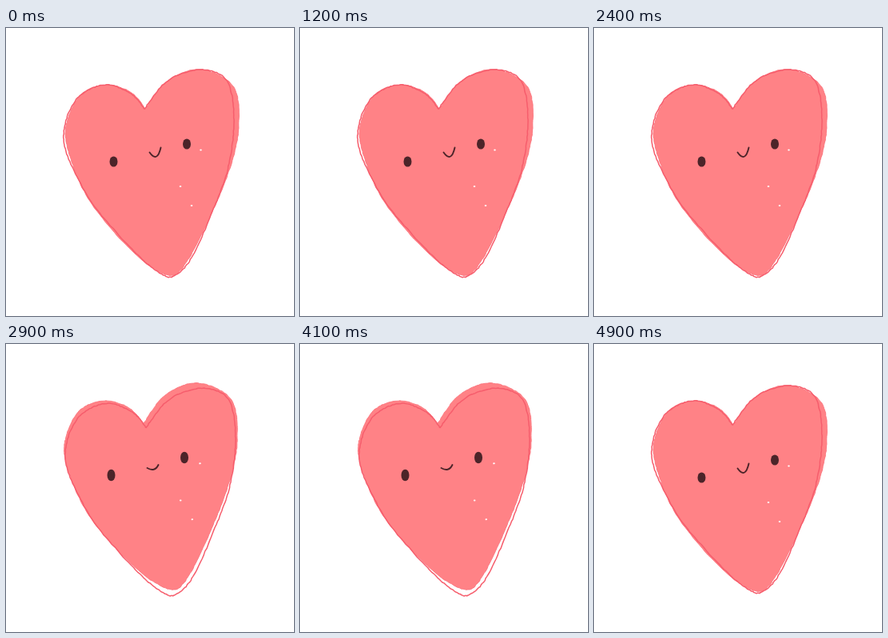
An HTML page with a canvas for the animation above (5000 ms loop, 360 px wide and 360 px high).

```html
<!DOCTYPE html>
<html lang="en">
<head>
<meta charset="utf-8">
<title>Wobbling heart</title>
<style>
  html, body { margin: 0; width: 100%; height: 100%; overflow: hidden; background: #fff; }
  canvas { display: block; width: 360px; height: 360px; }
</style>
</head>
<body>
<canvas id="stage" width="360" height="360"></canvas>
<script>
const ctx = document.getElementById('stage').getContext('2d');
const STEP = 100;
const ORDER = 'ABDABDACBCAB'.repeat(4).slice(0, 42) + 'BCBCBCCA';
const INK = '#4c2429';

// Key points run from the notch round to the notch, which stays sharp.
const FILL = [[174, 101], [157, 81], [126, 71], [94, 83], [76, 118], [78, 154], [105, 217],
  [160, 281], [203, 309], [226, 292], [256, 234], [281, 172], [291, 122], [284, 73],
  [243, 52], [202, 66], [174, 101]];
const LINE = [[173, 101], [156, 82], [124, 71], [91, 86], [74, 120], [76, 157], [108, 219],
  [160, 279], [192, 306], [210, 310], [232, 287], [261, 222], [278, 173], [285, 115],
  [276, 66], [243, 52], [202, 66], [173, 101]];
const SPECKS = [[218, 198], [232, 222], [243.5, 152.5]];

// Paint, outline and face slip against each other; turn is the paint's tilt.
const POSES = {
  A: { fill: [0, 0], turn: 0, line: [0, 0], face: [134.5, 167], smile: 1 },
  B: { fill: [-5, -2], turn: 0, line: [0, 1], face: [129.5, 164], smile: 0 },
  C: { fill: [0, -1], turn: -.022, line: [2, 4.5], face: [131, 163], smile: 0 },
  D: { fill: [0, -1.5], turn: -.026, line: [2, 3.3], face: [131.5, 164], smile: 0 }
};

const noise = n => {
  const v = Math.sin(n * 127.1) * 43758.5453;
  return v - Math.floor(v) - .5;
};

// Catmull-Rom through the points, with a slight hand-drawn tremble
function trace(points, seed) {
  const path = new Path2D();
  const last = points.length - 1;
  const at = i => points[Math.max(0, Math.min(last, i))];
  let n = seed * 1000;
  for (let i = 0; i < last; i++) {
    const [p, q, r, s] = [at(i - 1), at(i), at(i + 1), at(i + 2)];
    for (let u = 0; u < 1; u += .0625) {
      const [x, y] = [0, 1].map(k => .5 * (2 * q[k] + (r[k] - p[k]) * u
        + (2 * p[k] - 5 * q[k] + 4 * r[k] - s[k]) * u * u
        + (3 * q[k] - p[k] - 3 * r[k] + s[k]) * u ** 3) + noise(++n) * .8);
      path.lineTo(x, y);
    }
  }
  path.closePath();
  return path;
}

const fillPath = trace(FILL, 1);
const linePath = trace(LINE, 2);

function placed([x, y], paint, turn = 0) {
  ctx.save();
  ctx.translate(x + 180, y + 190);
  ctx.rotate(turn);
  ctx.translate(-180, -190);
  paint();
  ctx.restore();
}

function ellipse(x, y, rx, ry, color) {
  ctx.fillStyle = color;
  ctx.beginPath();
  ctx.ellipse(x, y, rx, ry, 0, 0, Math.PI * 2);
  ctx.fill();
}

function stroke(path, color, width) {
  ctx.strokeStyle = color;
  ctx.lineWidth = width;
  ctx.stroke(path);
}

function drawFace([x, y], smile) {
  const ry = 7.3 - .7 * smile;
  ellipse(x, y, 5, ry, INK);
  ellipse(x + 91.5, y - 22, 5, ry, INK);
  const mouth = new Path2D();
  mouth.moveTo(x + 45, y - 9 - 2.5 * smile);
  mouth.quadraticCurveTo(x + 54.5, y - 3.5 + 5.5 * smile, x + 59, y - 13 - 4.5 * smile);
  stroke(mouth, INK, 1.9);
}

function draw(index) {
  const pose = POSES[ORDER[index]];
  ctx.fillStyle = '#fff';
  ctx.fillRect(0, 0, 360, 360);
  ctx.lineCap = ctx.lineJoin = 'round';

  placed(pose.fill, () => {
    ctx.fillStyle = '#ff8286';
    ctx.fill(fillPath);
    stroke(fillPath, '#fb747d', .9);
    for (const [x, y] of SPECKS) ellipse(x, y, 1.3, 1, '#fff');
  }, pose.turn);
  placed(pose.line, () => stroke(linePath, '#f65d6c', 1.5));
  drawFace(pose.face, pose.smile);
}

function tick(now) {
  draw(Math.floor(now / STEP) % ORDER.length);
  requestAnimationFrame(tick);
}
draw(0);
requestAnimationFrame(tick);
</script>
</body>
</html>
```
